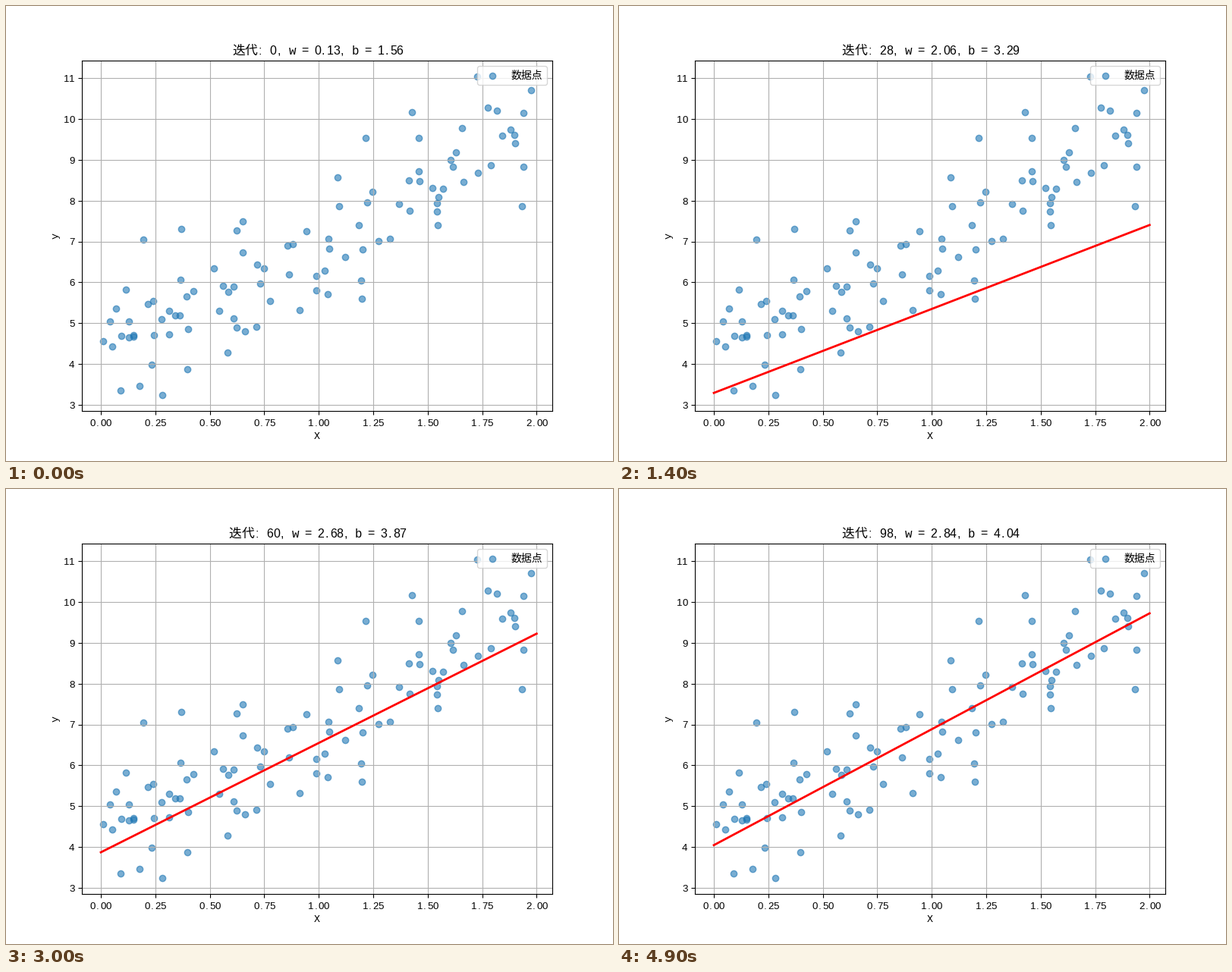
Animation of 800 by 600 pixels, one loop 5 s. Source, as a matplotlib script:

```python
import numpy as np
import matplotlib.pyplot as plt
from matplotlib.animation import FuncAnimation

WIDTH, HEIGHT, DPI = 800, 600, 100
FRAMES, INTERVAL = 50, 100
STEPS_PER_FRAME = 2
LEARNING_RATE = 0.01
CJK, SANS, MONO = "Noto Sans CJK JP", "Liberation Sans", "Liberation Mono"

# Noisy linear data and the random starting parameters share one seed.
np.random.seed(42)
x = 2 * np.random.rand(100)
y = 4 + 3 * x + np.random.randn(100)
w, b = np.random.randn(), np.random.randn()

history = []
for _ in range(FRAMES * STEPS_PER_FRAME):
    error = w * x + b - y
    w -= LEARNING_RATE * 2 * np.mean(error * x)
    b -= LEARNING_RATE * 2 * np.mean(error)
    history.append((w, b))

fig, ax = plt.subplots(figsize=(WIDTH / DPI, HEIGHT / DPI), dpi=DPI)
ax.scatter(x, y, alpha=0.6, label="数据点")
line, = ax.plot([], [], "r-", lw=2)
x_limits, y_limits = ax.get_xlim(), ax.get_ylim()
x_ticks, y_ticks = np.arange(0, 2.01, 0.25), np.arange(3, 12)
ax.set(xticks=x_ticks, yticks=y_ticks, xlim=x_limits, ylim=y_limits)
ax.tick_params(labelbottom=False, labelleft=False)
ax.grid(True)
ax.legend(loc="upper right", prop={"family": CJK, "size": 10})


def is_wide(char):
    return ord(char) > 0x2E80


def text_width(text, size):
    em = size * DPI / 72
    return sum(em if is_wide(c) else em / 2 for c in text)


def put_text(text, anchor_x, baseline, size, align=0.5):
    """Set text in half-em cells; positions are pixels from the top left."""
    em = size * DPI / 72
    left = anchor_x - align * text_width(text, size)
    artists = []
    for char in text:
        cell = text_width(char, size)
        if char != " ":
            wide, point = is_wide(char), char in ".,:"
            family = CJK if wide else MONO if char.isalpha() else SANS
            pos = left + (0.08 * em if point else cell / 2)
            artists.append(fig.text(
                pos / WIDTH, 1 - baseline / HEIGHT, char,
                family=family, size=size if wide else 0.95 * size,
                ha="left" if point else "center", va="baseline"))
        left += cell
    return artists


for tick in x_ticks:
    px = ax.transData.transform((tick, y_limits[0]))[0]
    put_text(f"{tick:.2f}", px, 554.5, 10)
for tick in y_ticks:
    py = HEIGHT - ax.transData.transform((x_limits[0], tick))[1]
    put_text(str(tick), 90.3, py + 4.8, 10, align=1)
put_text("X", 410, 571, 10)
fig.text(65.5 / WIDTH, 1 - 303 / HEIGHT, "y", family=MONO, size=9.5,
         rotation=90, ha="center", va="center")

title = []


def update(frame):
    step = frame * STEPS_PER_FRAME
    w, b = history[step]
    line.set_data([0, 2], [b, 2 * w + b])
    for artist in title:
        artist.remove()
    title[:] = put_text(f"迭代: {step}, w = {w:.2f}, b = {b:.2f}",
                        410.5, 63.6, 12)
    return [line, *title]


anim = FuncAnimation(fig, update, frames=FRAMES, interval=INTERVAL,
                     repeat=True, repeat_delay=0, blit=False)
plt.show()
```
